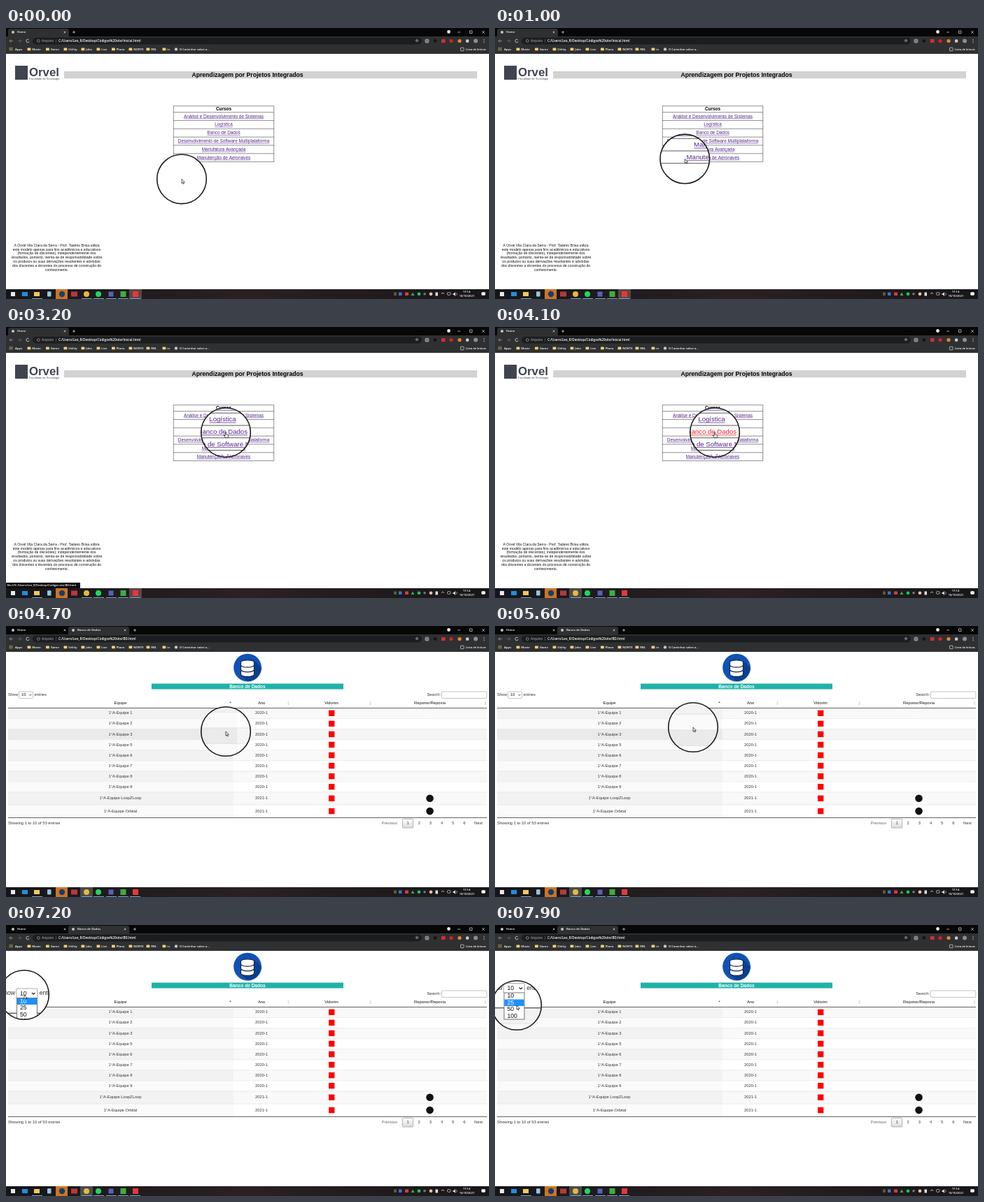
Animation of 690x388 px, one loop 8000 ms. Source, as an HTML page with a canvas:

```html
<!DOCTYPE html>
<html lang="pt-BR">
<head>
<meta charset="utf-8">
<title>Home</title>
<style>
html, body { margin: 0; width: 100%; height: 100%; overflow: hidden; background: #fff; }
canvas { display: block; width: 690px; height: 388px; }
</style>
</head>
<body>
<canvas id="stage" width="690" height="388"></canvas>
<script>
const ctx = document.getElementById('stage').getContext('2d');
const LOOP = 8000, STEP = 100, ZOOM = 1.5, RADIUS = 35.3;
const ARIAL = '"Liberation Sans", Arial, sans-serif';
const UI = '"Open Sans", "Noto Sans", sans-serif';
const TAB_OPENS = 4300, LIST_OPENS = 7200;

// pointer stops: time, x, y
const path = [
  [0, 251, 216.3], [400, 251, 216.3], [1000, 271.2, 187.4], [1700, 304, 141], [2000, 304, 141],
  [2200, 304, 146], [2700, 314, 151], [4700, 314, 151], [5400, 283, 145],
  [5700, 283, 145], [6300, 26, 100], [7400, 26, 100], [7900, 31, 115]
];
const courses = ['Análise e Desenvolvimento de Sistemas', 'Logística', 'Banco de Dados',
  'Desenvolvimento de Software Multiplataforma', 'Manufatura Avançada', 'Manutenção de Aeronaves'];
const notice = ['A Orvel Vila Clara da Serra - Prof. Tadeno Brisa utiliza',
  'este modelo apenas para fins acadêmicos e educativos',
  '(formação de discentes), independentemente dos',
  'resultados, portanto, isenta-se de responsabilidade sobre',
  'os produtos ou suas derivações resultantes e advindas',
  'dos discentes a docentes do processo de construção do', 'conhecimento.'];
const teams = ['1', '2', '3', '5', '6', '7', '8', '9', 'LoopZLoop', 'Orbital'];
const rowTop = i => i < 9 ? 117.5 + i * 15.05 : 237.7 + (i - 8) * 18.4;

function pointer(t) {
  let i = 0;
  while (i < path.length - 2 && t >= path[i + 1][0]) i++;
  const [a, b] = [path[i], path[i + 1]];
  let k = Math.min(1, (t - a[0]) / (b[0] - a[0]));
  k = k * k * (3 - 2 * k);
  return { x: a[1] + (b[1] - a[1]) * k, y: a[2] + (b[2] - a[2]) * k };
}

function gradient(x0, y0, x1, y1, ...colors) {
  const g = ctx.createLinearGradient(x0, y0, x1, y1);
  colors.forEach((c, i) => g.addColorStop(i / (colors.length - 1), c));
  return g;
}
function rect(x, y, w, h, color) {
  ctx.fillStyle = color;
  ctx.fillRect(x, y, w, h);
}
function frame(x, y, w, h, color, fill, r = 1) {
  ctx.beginPath();
  ctx.roundRect(x, y, w, h, r);
  if (fill) { ctx.fillStyle = fill; ctx.fill(); }
  if (color) { ctx.strokeStyle = color; ctx.lineWidth = .7; ctx.stroke(); }
}
function dot(x, y, r, color) {
  ctx.beginPath();
  ctx.arc(x, y, r, 0, 7);
  ctx.fillStyle = color;
  ctx.fill();
}
function line(color, width, ...p) {
  ctx.beginPath();
  for (let i = 0; i < p.length; i += 2) ctx.lineTo(p[i], p[i + 1]);
  ctx.strokeStyle = color;
  ctx.lineWidth = width;
  ctx.stroke();
}
function shape(color, ...p) {
  ctx.beginPath();
  for (let i = 0; i < p.length; i += 2) ctx.lineTo(p[i], p[i + 1]);
  ctx.fillStyle = color;
  ctx.fill();
}
function text(s, x, y, size, color, align = 'left', font = ARIAL, weight = '') {
  ctx.font = `${weight} ${size}px ${font}`;
  ctx.textAlign = align;
  ctx.fillStyle = color;
  ctx.fillText(s, x, y);
}
const label = (s, x, y, size = 4.3, color = '#fff', align) => text(s, x, y, size, color, align, UI, '600');

function cross(x, y, r) {
  line('#ddd', .7, x - r, y - r, x + r, y + r);
  line('#ddd', .7, x - r, y + r, x + r, y - r);
}
function tab(x, title, active) {
  if (active) frame(x, 1, 87, 16, null, '#2f3032', 3);
  dot(x + 7, 6, 2, '#c4c6c8');
  label(title, x + 13, 6.2);
  cross(x + 81, 6, 1.3);
}

function browser(second) {
  rect(0, 0, 690, 37, '#2f3032');
  rect(0, 0, 690, 12, '#070707');
  tab(3, 'Home', !second);
  if (second) tab(89, 'Banco de Dados', true);
  const plus = second ? 184 : 97;
  line('#ddd', .7, plus - 2, 6, plus + 2, 6);
  line('#ddd', .7, plus, 4, plus, 8);
  dot(632.5, 5.5, 2.4, '#e8e8e8');
  line('#ddd', .7, 645, 6, 649, 6);
  frame(662.5, 4, 3.5, 3.5, '#ddd', null, 0);
  cross(682, 6, 1.8);

  line('#999', .8, 7.5, 16, 5, 18.5, 7.5, 21);
  line('#999', .8, 5, 18.5, 10, 18.5);
  line('#666', .8, 19.5, 16, 22, 18.5, 19.5, 21);
  line('#666', .8, 17, 18.5, 22, 18.5);
  ctx.beginPath();
  ctx.arc(31, 18.5, 2.2, .3, 5.6);
  ctx.strokeStyle = '#ddd';
  ctx.lineWidth = .8;
  ctx.stroke();
  frame(38, 13.7, 556, 9.8, null, '#1c1d1f', 5);
  frame(44.4, 16.6, 3.8, 3.8, '#aaa', null, 2);
  label('Arquivo', 51, 18.9, 4.5, '#999');
  line('#777', .5, 71.5, 16, 71.5, 21);
  label('C:/Users/Leo_R/Desktop/Códigos%20site/' + (second ? 'BD' : 'Inicial') + '.html', 75, 18.9, 4.65);
  label('☆', 587, 18.5, 6, '#ccc', 'center');
  frame(599, 16.2, 4.8, 4.8, '#bbb', '#777');
  dot(613, 18.5, 2.4, '#151515');
  rect(622, 16, 5.5, 5, '#d92b35');
  dot(636, 18.5, 2.6, '#d6202b');
  dot(648, 18.5, 2.6, '#e8862d');
  frame(657, 16.5, 4.2, 4.2, null, '#ccc');
  dot(671, 18.5, 3, '#8b8e98');
  [16.3, 18.5, 20.7].forEach(y => dot(683, y, .6, '#ddd'));

  ['#e75', '#fc4', '#7c7'].forEach((c, i) =>
    [5.2, 7, 8.8].forEach(x => rect(x - .5, 27.7 + i * 1.8, 1.1, 1.1, c)));
  label('Apps', 13, 30.6);
  [['Movie', 33], ['Game', 59.5], ['Utility', 85], ['Jobs', 110], ['Live', 132], ['Plano', 153.5],
    ['NORTE', 178], ['RBL', 203], ['in', 226]].forEach(([name, x]) => {
    frame(x - 2.5, 28.5, 4.8, 3.8, null, '#f4d06f', .5);
    label(name, x + 4.2, 30.6);
  });
  dot(243, 30.4, 2.2, '#c4c6c8');
  label('O Caminhar sobre a...', 248, 30.6, 4.1);
  frame(649.5, 28.2, 4.5, 4.5, '#ddd', null, .5);
  label('Lista de leitura', 657, 30.6, 4);
}

function taskbar(browserActive) {
  rect(0, 374, 690, 14, gradient(0, 0, 690, 0, '#15161a', '#2a2123', '#171619'));
  rect(browserActive ? 106 : 176, 374, 18, 14, browserActive ? '#4a4b4e' : '#5a4648');
  rect(71, 374, 17, 14, '#cf7420');
  rect(7, 378, 6, 6, '#e4e8ec');
  rect(23, 378, 8, 6, '#1d8fe0');
  rect(40, 378, 8, 6, '#f3c85a');
  frame(59, 377.3, 5.5, 7.3, null, '#8fc8e4');
  dot(80, 381, 4.2, '#123f72');
  rect(93, 377.5, 9, 7, '#b53a3a');
  dot(115, 381, 4, '#e8b83a');
  dot(132, 381, 4, '#1ed760');
  rect(146.5, 377.5, 7, 7, '#5661b8');
  rect(163.5, 377, 8, 8, '#3fae3d');
  rect(181, 377, 8, 8, '#e5393a');
  [37, 108, 125, 143, 160, 177].forEach(x => rect(x, 387, 15, 1, '#78a9cf'));
  rect(554, 378.5, 4, 4.5, '#5d5a32');
  rect(561, 378.5, 4.5, 4.5, '#3f6fd0');
  rect(570, 378.5, 5, 4.5, '#d83a3a');
  shape('#28b64a', 578.5, 383, 581, 378.5, 583.5, 383);
  dot(590, 380.8, 2.4, '#22c35d');
  dot(598, 380.8, 1.8, '#778');
  dot(607, 380.8, 2.4, '#e5c59a');
  rect(613.5, 378.5, 3.5, 5, '#ddd');
  line('#ddd', .8, 622, 381, 624, 378.8, 626, 381);
  frame(630.5, 378.7, 4.5, 3.6, '#ddd');
  shape('#ddd', 638.5, 380, 640, 380, 642, 378, 642, 384, 640, 382, 638.5, 382);
  line('#ddd', .6, 643.5, 379, 644.3, 381, 643.5, 383);
  label('17:14', 658, 378, 4.2, '#fff', 'center');
  label('10/10/2021', 658.5, 384.4, 4, '#fff', 'center');
  frame(679.5, 378.5, 5, 4, '#eee', '#eee');
}

function home(t) {
  rect(13, 54, 18, 20, '#404451');
  text('Orvel', 33, 64.7, 16.8, '#404451', 'left', ARIAL, 'bold');
  text('Faculdade de Tecnologia', 33, 72.8, 3.9, '#404451');
  rect(83, 62, 590, 10.3, '#d2d2d2');
  text('Aprendizagem por Projetos Integrados', 345, 67.4, 8.65, '#000', 'center', ARIAL, 'bold');
  const top = i => i ? 108.8 + i * 11.83 : 111.7;
  for (let i = 0; i < 8; i++) line('#555', .65, 239, top(i), 383, top(i));
  line('#555', .65, 239.3, 111.7, 239.3, top(7));
  line('#555', .65, 382.7, 111.7, 382.7, top(7));
  text('Cursos', 311, 116.4, 6.4, '#000', 'center', ARIAL, 'bold');
  courses.forEach((name, i) => {
    const y = 126.9 + i * 11.83;
    const color = i === 2 && t >= 3900 ? '#f3202c' : '#56288c';
    text(name, 311, y, 6.4, color, 'center');
    const w = ctx.measureText(name).width;
    line(color, .5, 311 - w / 2, y + 2.9, 311 + w / 2, y + 2.9);
  });
  notice.forEach((s, i) => text(s, 72.5, 311.3 + i * 5.8, 5.1, '#111', 'center'));
  if (t >= 1500 && t < 4000) {
    const file = t < 2500 ? 'LOG' : 'BD';
    rect(0, 366, 106, 8, '#0c0c0c');
    label(`file:///C:/Users/Leo_R/Desktop/Codigos site/${file}.html`, 1.5, 370.3, 3.95);
  }
}

function database() {
  dot(345.5, 60, 20.2, '#c9d2e2');
  ctx.save();
  dot(345, 59.5, 19.8, '#0f52b5');
  ctx.clip();
  shape('#0b3f91', 355, 50, 380, 75, 360, 95, 336, 70);
  ctx.restore();
  for (let i = 2; i >= 0; i--) {
    const y = 52 + i * 6.6;
    ctx.beginPath();
    ctx.ellipse(345, y, 9.5, 3.2, 0, Math.PI, 0);
    ctx.ellipse(345, y + 4, 9.5, 3.2, 0, 0, Math.PI);
    ctx.closePath();
    ctx.fillStyle = '#fff';
    ctx.fill();
    ctx.strokeStyle = '#17263d';
    ctx.lineWidth = 1.2;
    ctx.stroke();
  }
}

function sortMark(x, up, down) {
  shape(up, x - 1.5, 110, x, 108, x + 1.5, 110);
  if (down) shape(down, x - 1.5, 111, x, 113, x + 1.5, 111);
}

function teamsPage(p, open) {
  const cell = (s, x, y, color = '#333', align = 'center') => text(s, x, y, 5.75, color, align);
  database();
  rect(208, 82.5, 274, 8, '#20b2aa');
  text('Banco de Dados', 345, 86.7, 6.55, '#fff', 'center', ARIAL, 'bold');

  cell('Show', 3, 98.7, '#333', 'left');
  frame(18.5, 94, 20, 9.5, '#aaa', '#fff');
  cell('10', 22, 98.8, '#111', 'left');
  line('#222', .8, 33.3, 98, 34.8, 99.5, 36.3, 98);
  cell('entries', 40.5, 98.7, '#333', 'left');
  cell('Search:', 621, 98.7, '#333', 'right');
  frame(622.4, 94, 64.4, 9.5, '#aaa', '#fff');

  cell('Equipe', 163.5, 110.4, '#111');
  cell('Ano', 365, 110.4, '#111');
  cell('Vidorim', 465, 110.4, '#111');
  cell('Reponor/Repovia', 605.5, 110.4, '#111');
  sortMark(320.5, '#5560e0');
  [403.5, 520.5, 685].forEach(x => sortMark(x, '#ccc', '#ccc'));

  teams.forEach((name, i) => {
    const y = rowTop(i), h = rowTop(i + 1) - y, mid = y + h / 2 - .2;
    const over = !open && p.y + 3 >= y && p.y + 3 < y + h;
    rect(3, y, 684, h, over ? '#f5f5f5' : i % 2 ? '#fff' : '#f9f9f9');
    rect(3, y, 322, h, over ? '#eaeaea' : i % 2 ? '#fafafa' : '#f2f2f2');
    if (i) line('#ddd', .5, 3, y, 687, y);
    cell('1°A-Equipe ' + name, 163.5, mid);
    cell(i < 8 ? '2020-1' : '2021-1', 365, mid);
    rect(461, mid - 4.2, 8.4, 8.4, '#f00');
    if (i > 7) dot(605.5, mid, 5.3, '#111');
  });
  line('#222', .7, 3, 117.5, 687, 117.5);
  line('#222', .7, 3, 274.5, 687, 274.5);

  cell('Showing 1 to 10 of 53 entries', 3, 282.3, '#333', 'left');
  cell('Previous', 548, 282.5, '#666');
  frame(566.4, 276.4, 15.2, 12.6, '#979797', gradient(0, 276, 0, 289, '#fff', '#dcdcdc'));
  for (let i = 1; i < 7; i++) cell(i, 557.9 + i * 16.15, 282.5);
  cell('Next', 675, 282.5);

  if (open) {
    const size = 6.33;
    const pick = Math.max(0, Math.min(3, Math.floor((p.y - 103) / size)));
    frame(19, 103, 19.3, size * 4, '#777', '#fff', 0);
    ['10', '25', '50', '100'].forEach((s, i) => {
      const y = 103 + i * size;
      if (i === pick) rect(19.3, y, 18.7, size, '#1e90ff');
      cell(s, 22, y + size / 2, i === pick ? '#fff' : '#111', 'left');
    });
  }
}

function desktop(t, p) {
  const second = t >= TAB_OPENS;
  rect(0, 0, 690, 388, '#fff');
  if (second) teamsPage(p, t >= LIST_OPENS);
  else home(t);
  browser(second);
  taskbar(t >= 3900);
}

function cursor(t, p) {
  const overLink = t < TAB_OPENS && ((t >= 1600 && t < 2100) || t >= 2600);
  const outline = overLink
    ? [-.7, 0, .7, 0, .7, 2.8, 3.6, 3.6, 3.2, 7.6, -1, 7.6, -2.9, 4.2, -.7, 4.6]
    : [0, 0, 0, 6.2, 1.4, 4.9, 2.4, 7, 3.3, 6.6, 2.4, 4.6, 4.3, 4.5];
  ctx.save();
  ctx.translate(p.x, p.y);
  shape('#fff', ...outline);
  ctx.closePath();
  ctx.strokeStyle = '#111';
  ctx.lineWidth = .7;
  ctx.stroke();
  ctx.restore();
}

function draw(now) {
  const t = Math.floor(now % LOOP / STEP) * STEP;
  const p = pointer(t);
  ctx.textBaseline = 'middle';
  desktop(t, p);

  ctx.save();
  ctx.beginPath();
  ctx.arc(p.x, p.y, RADIUS, 0, 7);
  ctx.clip();
  ctx.translate(p.x, p.y);
  ctx.scale(ZOOM, ZOOM);
  ctx.translate(-p.x, -p.y);
  desktop(t, p);
  ctx.restore();

  ctx.beginPath();
  ctx.arc(p.x, p.y, RADIUS, 0, 7);
  ctx.strokeStyle = '#1c1c1c';
  ctx.lineWidth = 1.6;
  ctx.stroke();
  cursor(t, p);
}

let start;
function tick(now) {
  start ??= now;
  draw(now - start);
  requestAnimationFrame(tick);
}
requestAnimationFrame(tick);
</script>
</body>
</html>
```
